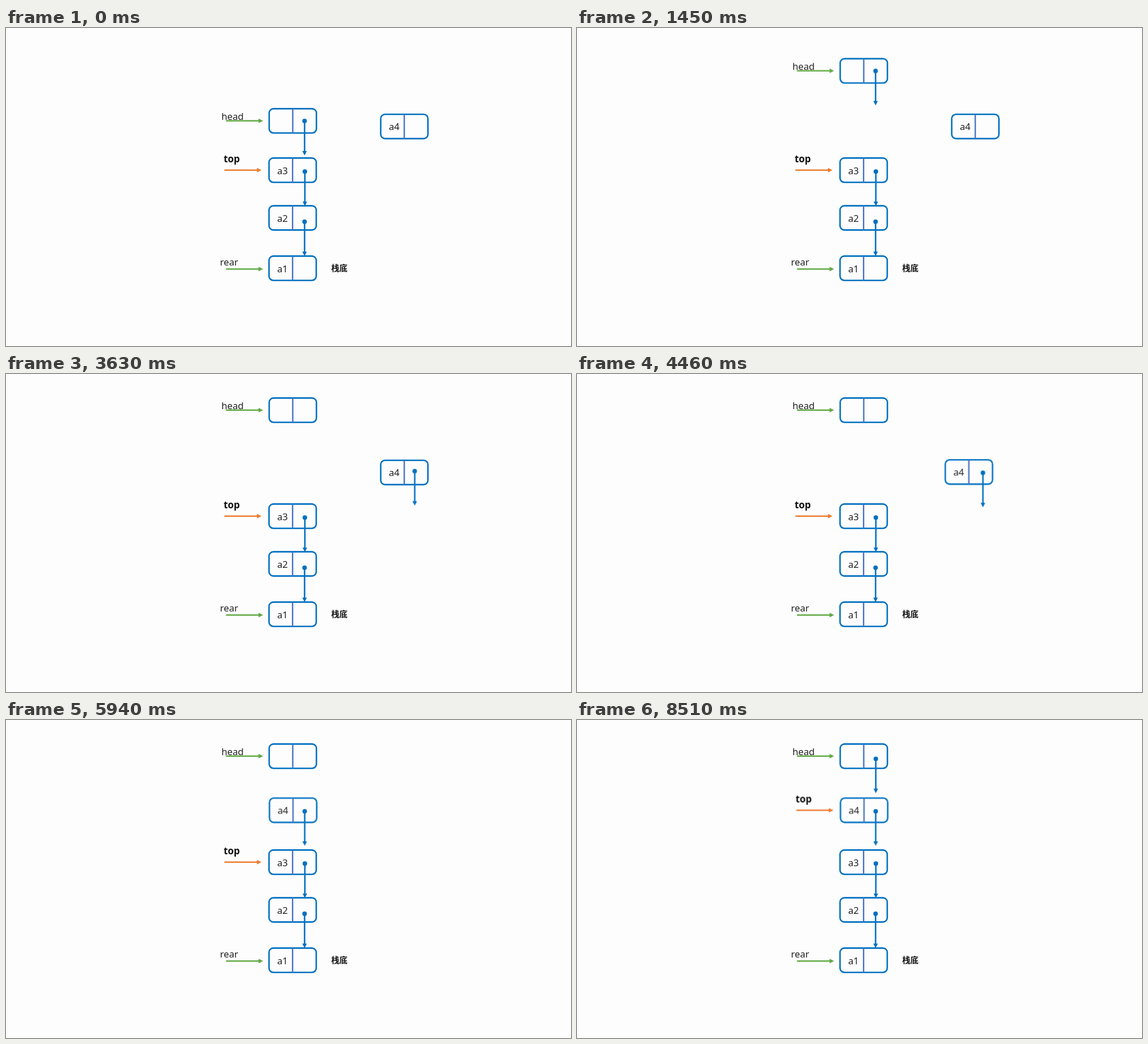
An HTML page for the animation above (8540 ms loop, 998 px wide and 561 px high).

```html
<!DOCTYPE html>
<html lang="zh">
<head>
<meta charset="utf-8">
<title>Linked stack push</title>
<style>
  html, body { margin: 0; width: 100%; height: 100%; overflow: hidden; background: #fdfdfd; }
  svg { display: block; width: 998px; height: 561px; }
  text { font: 16.7px "Noto Sans", "Open Sans", sans-serif; fill: #222; }
  .bold { font-weight: 700; font-size: 17px; fill: #111; }
  .cjk { font: 700 14.4px "Noto Sans CJK SC", "Noto Sans CJK", sans-serif; fill: #111; }
  .frame { fill: none; stroke: #0070c0; stroke-width: 2.6; }
  .split { stroke: #4472c4; stroke-width: 2.4; }
  .line { stroke: currentColor; stroke-width: 2.6; }
  .tip { fill: currentColor; }
  .green { color: #62aa46; }
  .orange { color: #ed7d31; }
  .blue { color: #0070c0; }

  /* One 8540 ms loop; every move eases in and out like a sine. */
  .head, .link, .node, .next, .top {
    animation: 8540ms cubic-bezier(.37, 0, .63, 1) infinite;
  }
  .head { animation-name: head; }
  .link { animation-name: link; }
  .node { animation-name: node; }
  .next { animation-name: next; animation-timing-function: step-end; }
  .top { animation-name: top; }

  @keyframes head {
    0%, 2.272% { transform: translate(0, 0); }
    21.241%, 100% { transform: translate(0, -100px); }
  }
  @keyframes link {
    0%, 2.272% { transform: translate(0, 0); }
    21.241%, 25.796% { transform: translate(0, -100px); }
    44.766%, 49.274% { transform: translate(201.3px, 11.1px); }
    68.244%, 100% { transform: translate(.2px, -2.9px); }
  }
  @keyframes node {
    0%, 49.274% { transform: translate(0, 0); }
    68.244%, 100% { transform: translate(-196.5px, -14.5px); }
  }
  @keyframes next {
    0% { opacity: 0; }
    73.3%, 100% { opacity: 1; }
  }
  @keyframes top {
    0%, 78.29% { transform: translate(0, 0); }
    97.26%, 100% { transform: translate(1.6px, -91.5px); }
  }
</style>
</head>
<body>
<svg viewBox="0 0 998 561">
  <defs>
    <g id="cell">
      <rect class="frame" width="83.4" height="42.8" rx="7.5"/>
      <path class="split" d="M41.6 0V42.8"/>
    </g>
    <g id="pointer">
      <path class="line" d="M0 0H59"/>
      <path class="tip" d="M65.5 0L57.5 -4V4Z"/>
    </g>
    <g id="down">
      <circle class="tip" r="4"/>
      <path class="line" d="M0 0V54"/>
      <path class="tip" d="M0 60.7L-4 52.9H4Z"/>
    </g>
  </defs>

  <g class="head">
    <text x="380.5" y="161.6">head</text>
    <use href="#pointer" class="green" x="388.6" y="163.8"/>
    <use href="#cell" x="464.9" y="142.4"/>
  </g>

  <text x="378" y="419.4">rear</text>
  <use href="#pointer" class="green" x="388.6" y="425.3"/>
  <text class="cjk" x="574.4" y="429.2">栈底</text>

  <use href="#cell" x="464.6" y="229.4"/>
  <text x="479" y="257.8">a3</text>
  <use href="#cell" x="464.6" y="313.6"/>
  <text x="479" y="341.8">a2</text>
  <use href="#cell" x="464.6" y="402.4"/>
  <text x="479" y="430.6">a1</text>
  <use href="#down" class="blue" x="527.9" y="253.3"/>
  <use href="#down" class="blue" x="527.4" y="341.7"/>

  <g class="node">
    <use href="#cell" x="661.9" y="152.3"/>
    <text x="676.2" y="180.3">a4</text>
  </g>
  <g class="link"><use href="#down" class="blue" x="527.4" y="164"/></g>
  <g class="next"><use href="#down" class="blue" x="527.8" y="68.4"/></g>

  <g class="top">
    <text class="bold" x="384.4" y="236.6">top</text>
    <use href="#pointer" class="orange" x="385.8" y="250.7"/>
  </g>
</svg>
</body>
</html>
```
